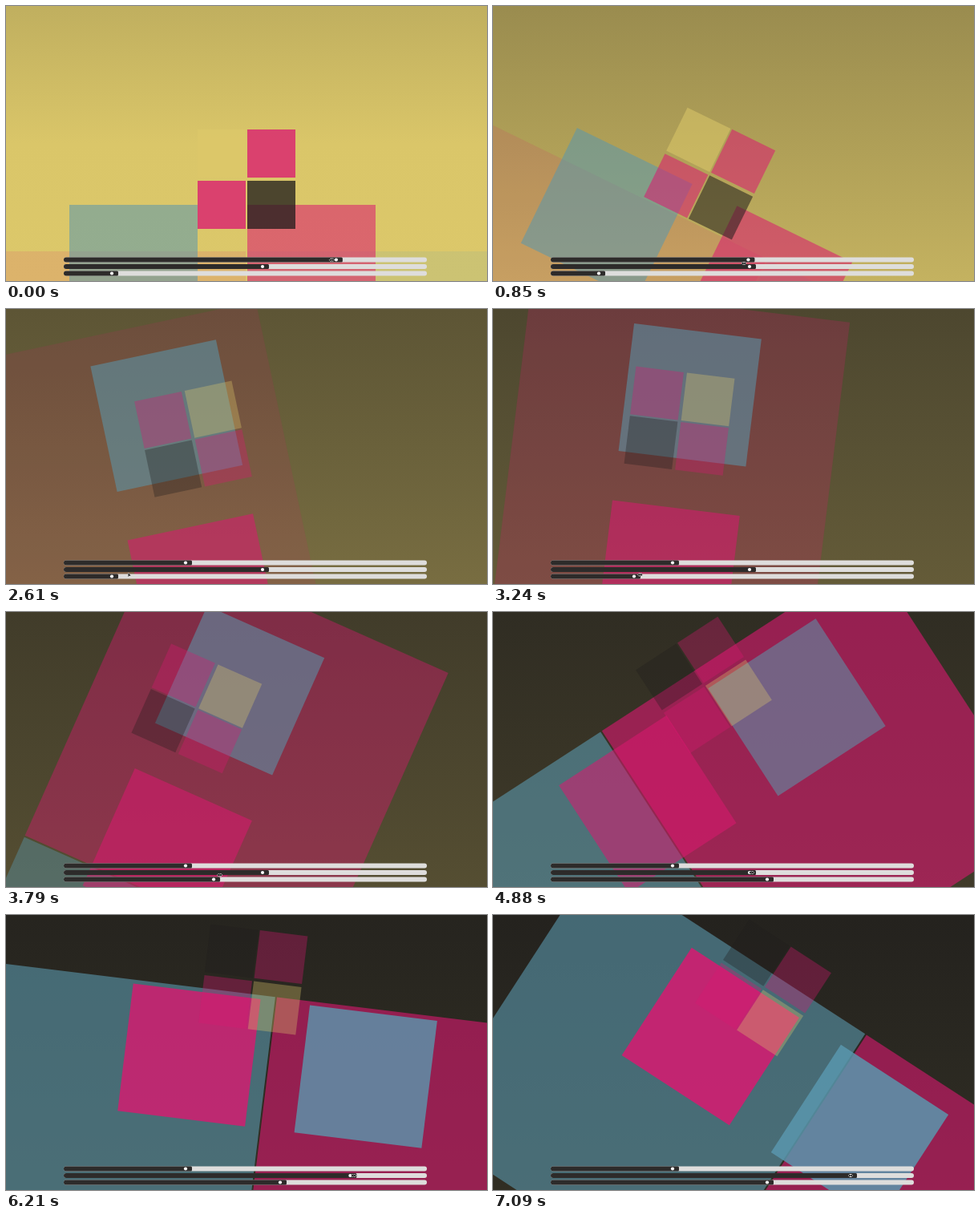
Write an HTML page with a canvas that moves like this. It is 600 px wide and 343 px high and loops after 7.12 s.

```html
<!DOCTYPE html>
<html lang="en">
<head>
<meta charset="utf-8">
<title>Rotating translucent squares</title>
<style>
html, body { margin: 0; width: 100%; height: 100%; overflow: hidden; background: #24221e; }
canvas { display: block; width: 600px; height: 343px; }
</style>
</head>
<body>
<canvas id="stage" width="600" height="343"></canvas>
<script>
const ctx = document.getElementById('stage').getContext('2d');
const LOOP = 7120;
const PINK = 'rgb(218,24,112)', BLUE = 'rgb(90,152,174)';
const YELLOW = 'rgb(221,200,106)', DARK = 'rgb(32,30,28)';

// Each group turns about (300, pivot); its squares sit side by side below it
const groups = [
  { slider: 2, pivot: 403, size: 400, left: -401, top: -97, colours: [PINK, BLUE] },
  { slider: 1, pivot: 256, size: 160, left: -221, top: -8, colours: [BLUE, PINK] },
  { slider: 0, pivot: 148, size: 60, left: -61, top: 6, colours: [YELLOW, PINK, PINK, DARK] }
];

// One drag per slider, in order of time (seconds)
const drags = [
  { row: 0, from: 412, to: 224, start: 0, end: 1.71 },
  { row: 2, from: 132, to: 342, start: 2.95, end: 4.34 },
  { row: 1, from: 320, to: 446, start: 4.9, end: 6.41 }
];
const rowY = row => 316.5 + row * 8.5;
const lerp = (a, b, f) => a + (b - a) * Math.min(1, Math.max(0, f));
const progress = (d, t) => (t - d.start) / (d.end - d.start);
const thumbAt = (row, t) => {
  const d = drags.find(d => d.row === row);
  return lerp(d.from, d.to, progress(d, t));
};

// The pointer drifts to the middle row while dragging, then heads for the next thumb
function cursorAt(t) {
  const i = drags.findLastIndex(d => t >= d.start);
  const d = drags[i], next = drags[i + 1];
  if (t <= d.end || !next) {
    const f = progress(d, t);
    return { x: lerp(d.from, d.to, f), y: lerp(rowY(d.row), rowY(1), f), free: false };
  }
  const f = (t - d.end) / (next.start - d.end);
  return { x: lerp(d.to, next.from, f), y: lerp(rowY(1), rowY(next.row), f), free: next.row === 2 };
}

function skyColour(k) {
  k = Math.min(1, k);
  return `rgb(${36 + 184 * k},${34 + 166 * k},${30 + 76 * k})`;
}

function drawSky(t) {
  const fade = (1 - t / 7.2) ** 2.25;
  const top = .85 * fade, bottom = 1.06 * fade + .07;
  const g = ctx.createLinearGradient(0, 0, 0, 343);
  g.addColorStop(0, skyColour(top));
  g.addColorStop(.5, skyColour((top + bottom) / 2));
  g.addColorStop(1, skyColour(bottom));
  ctx.fillStyle = g;
  ctx.fillRect(0, 0, 600, 343);
}

function drawGroup({ pivot, size, left, top, colours }, angle, alpha) {
  ctx.save();
  ctx.translate(300, pivot);
  ctx.rotate(angle);
  ctx.globalAlpha = alpha;
  colours.forEach((colour, i) => {
    const stepX = size === 160 ? 222 : size + 2;
    ctx.fillStyle = colour;
    ctx.fillRect(left + i % 2 * stepX, top + (i >> 1) * (size + 4), size, size);
  });
  ctx.restore();
}

function pill(y, w, colour, corners) {
  ctx.fillStyle = colour;
  ctx.beginPath();
  ctx.roundRect(72, y - 3, w, 6, corners);
  ctx.fill();
}

function drawSlider(thumb, row) {
  const y = rowY(row);
  pill(y, 453, '#dedddc', 3);
  pill(y, thumb + 8 - 72, '#2d2b2a', [3, 1.5, 1.5, 3]);
  ctx.fillStyle = '#fff';
  ctx.beginPath();
  ctx.arc(thumb, y, 2.1, 0, 7);
  ctx.fill();
}

function drawCursor({ x, y, free }) {
  const path = new Path2D(free
    ? 'M-1-2.5V2.5L.3 1.3H2.3Z'
    : 'M-3 0L-1-2V-.7H1V-2L3 0L1 2V.7H-1V2Z');
  ctx.save();
  ctx.translate(x, y);
  ctx.strokeStyle = '#eee';
  ctx.stroke(path);
  ctx.fillStyle = '#222';
  ctx.fill(path);
  ctx.restore();
}

const start = performance.now();

function draw() {
  const t = Math.max(0, performance.now() - start) % LOOP / 1000;
  const angle = Math.round(30.05 * t) * Math.PI / 180; // whole degrees
  const thumbs = [0, 1, 2].map(row => thumbAt(row, t));

  drawSky(t);
  // A slider's value is the opacity of its group
  for (const g of groups) drawGroup(g, angle, (thumbs[g.slider] - 80) / 437);
  thumbs.forEach(drawSlider);
  drawCursor(cursorAt(t + .05)); // thumbs lag a little behind the pointer
  requestAnimationFrame(draw);
}
draw();
</script>
</body>
</html>
```
